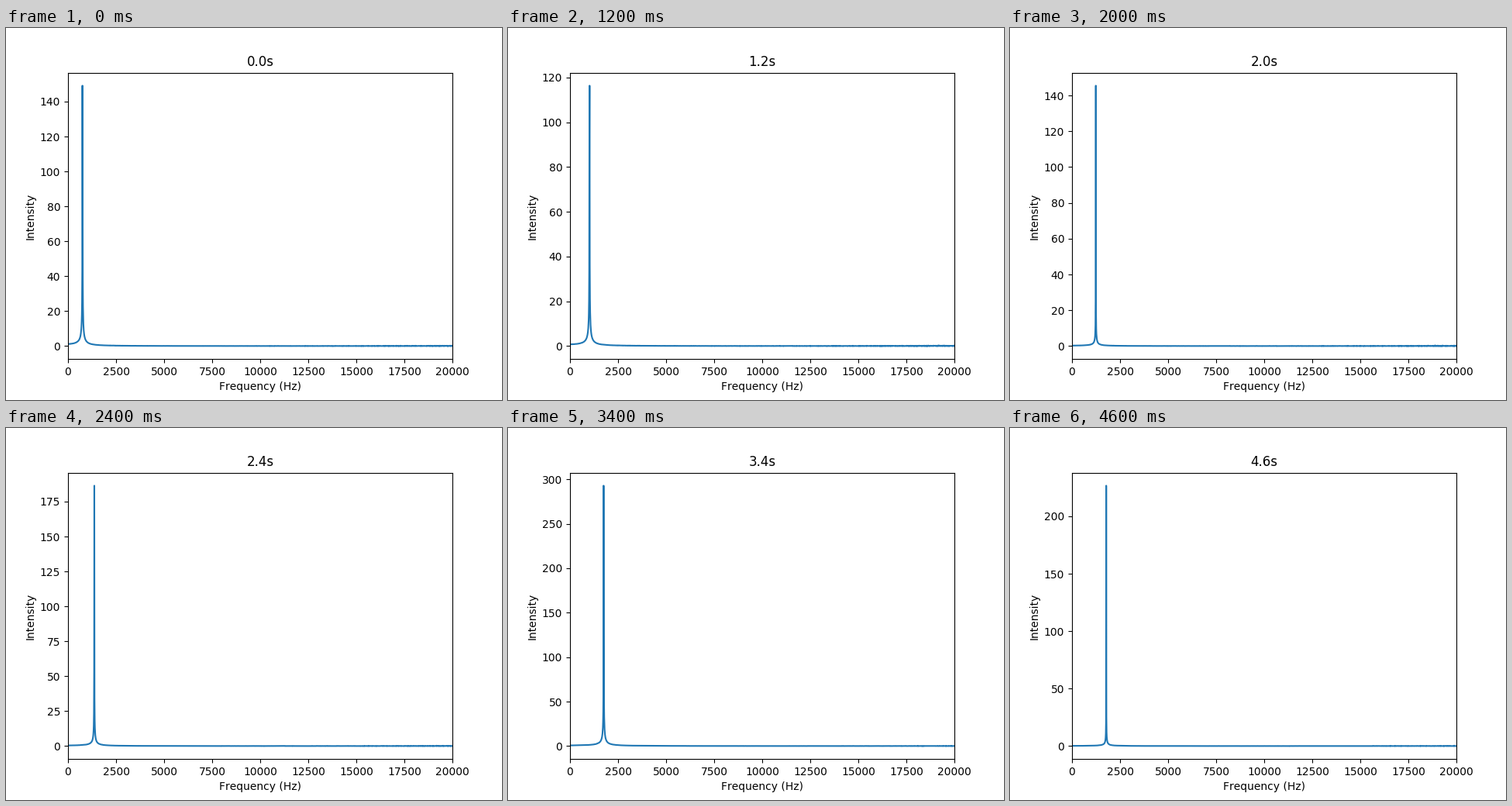
These frames come from a looping animation (640 px wide and 480 px high, 4700 ms). A matplotlib script:

```python
import numpy as np
import matplotlib.pyplot as plt
from matplotlib.animation import FuncAnimation

FRAMES = 47
STEP = 0.1                 # seconds per window
BIN_HZ = 1 / STEP
START_HZ, TOP_HZ = 754, 1781
GLIDE = 0.358              # octaves per second

# Loudness swells and breaths: (seconds, intensity)
LEVEL = [(0, 149.1), (0.7, 202.2), (1.4, 82), (1.6, 104.5), (2.4, 186.4),
         (2.7, 80), (3.0, 264.2), (3.8, 321.5), (4.6, 226.6)]

bins = np.arange(2206)
hiss = 0.02 + 0.1 * (bins / 2000) ** 4


def spectrum(i):
    """Leakage of one rising tone in a rectangular window, plus faint hiss."""
    t = i * STEP
    pitch = min(START_HZ * 2 ** (GLIDE * t), TOP_HZ) / BIN_HZ
    tone = np.abs(np.sinc(bins - pitch) + 0.5 * np.sinc(bins + pitch))
    level = np.interp(t, *zip(*LEVEL))
    noise = np.abs(np.random.default_rng(i).normal(size=bins.size))
    return level * tone / tone.max() + hiss * noise


plt.rcParams["text.kerning_factor"] = 6

fig, ax = plt.subplots(figsize=(6.4, 4.8), dpi=100)
line, = ax.plot(bins * BIN_HZ, spectrum(0))
ax.set_xlim(0, 20000)
ax.set_xlabel("Frequency (Hz)")
ax.set_ylabel("Intensity")
title = ax.set_title("0.0s")


def update(i):
    line.set_ydata(spectrum(i))
    ax.relim()
    ax.autoscale_view(scalex=False)
    title.set_text(f"{i * STEP:.1f}s")
    return line, title


anim = FuncAnimation(fig, update, frames=FRAMES, interval=100, repeat=True)
plt.show()
```
